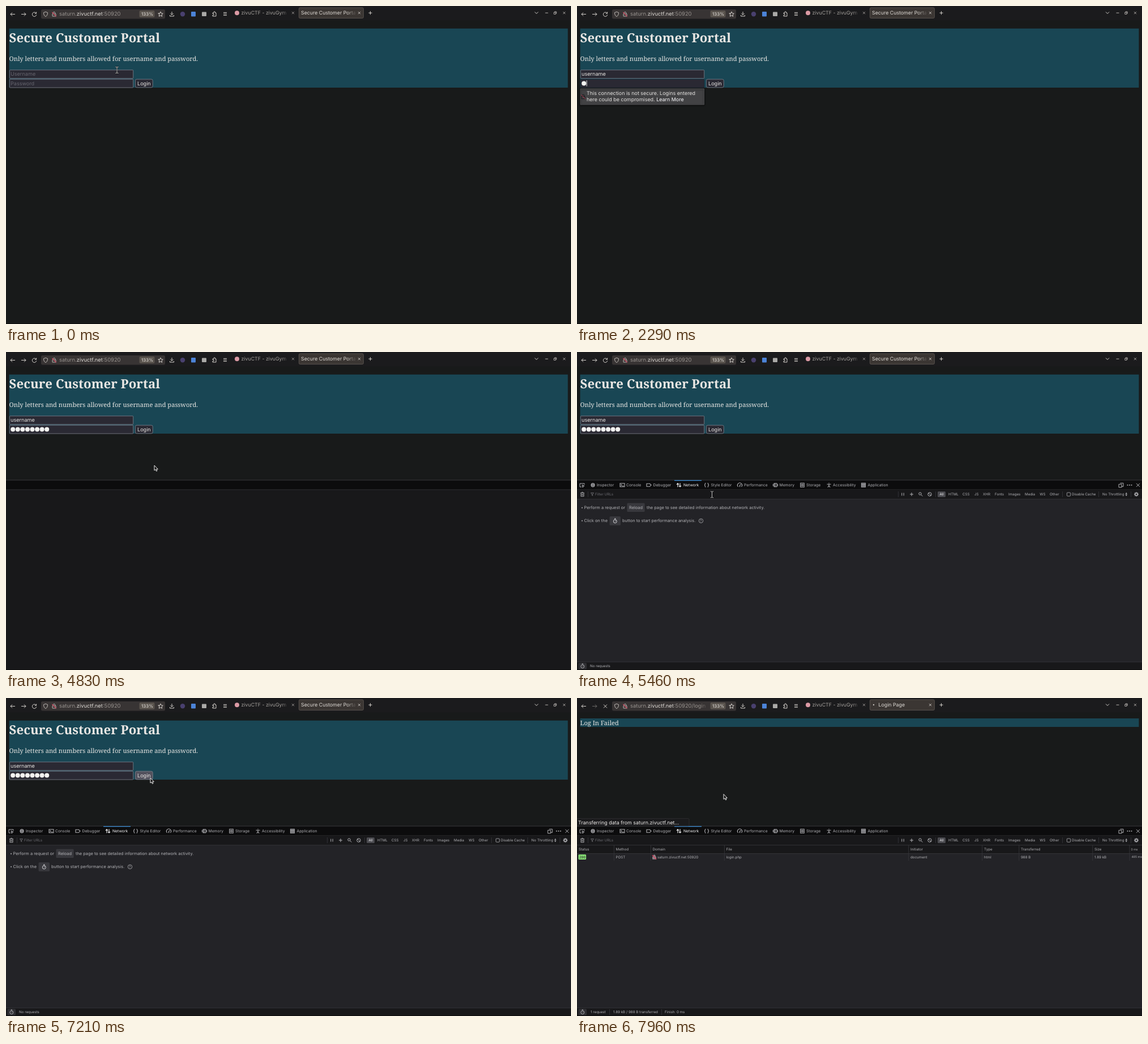
An HTML page with a canvas for the animation above (8 s loop, 998 px wide and 561 px high).

```html
<!DOCTYPE html>
<html lang="en">
<head>
<meta charset="utf-8">
<title>Login request</title>
<style>
html, body { margin: 0; width: 100%; height: 100%; overflow: hidden; background: #181a1a; }
canvas { display: block; }
</style>
</head>
<body>
<canvas id="stage" width="998" height="561"></canvas>
<script>
const ctx = document.getElementById('stage').getContext('2d');
ctx.textRendering = 'geometricPrecision';
const LOOP = 8000;
const HOST = 'saturn.zivuctf.net';
const UI = 'Inter, sans-serif', SERIF = '"Noto Serif", serif', MONO = '"DejaVu Sans Mono", monospace';

// Moments of the story, in ms
const T = {
  focus: 170, userPopup: 420, tab: 1880, closePopup: 4540,
  toolsBlank: 4760, toolsTabs: 4880, toolsFull: 4960, send: 7290, response: 7680
};
const userKeys = [800, 1120, 1260, 1330, 1400, 1470, 1540, 1610];
const passKeys = [...Array(8).keys()].map(i => 2290 + i * 165);

// Pointer path: time, x, y
const pointerPath = [
  [0, 196, 113], [80, 196, 113], [250, 194, 119], [3580, 196, 119], [3880, 262, 200], [5130, 262, 200],
  [5450, 240, 250], [5700, 205, 282], [5930, 210, 262], [6040, 220, 245], [6450, 245, 180],
  [6750, 254, 148], [6920, 255, 141], [7400, 255, 141], [7880, 259, 169.6], [8000, 259, 169.6]
];

function rect(x, y, w, h, color, radius = 0, border) {
  ctx.beginPath();
  ctx.roundRect(x, y, w, h, radius);
  if (color) { ctx.fillStyle = color; ctx.fill(); }
  if (border) { ctx.strokeStyle = border; ctx.lineWidth = 0.8; ctx.stroke(); }
}

function text(str, x, y, size, color, family = UI, weight = 400) {
  ctx.font = `${weight} ${size}px ${family}`;
  ctx.fillStyle = color;
  ctx.fillText(str, x, y);
}

function circle(x, y, r, color) {
  ctx.fillStyle = color;
  ctx.beginPath();
  ctx.arc(x, y, r, 0, 7);
  ctx.fill();
}

// Paths are centred on 0,0
const icons = {
  back: 'M4 0H-4M-1-3L-4 0L-1 3',
  forward: 'M-4 0H4M1-3L4 0L1 3',
  reload: 'M3-2A3.7 3.7 0 1 0 3.7 1M3.6-4V-1.3H.8',
  close: 'M-2-2L2 2M2-2L-2 2',
  stop: 'M-3-3L3 3M3-3L-3 3',
  plus: 'M-3 0H3M0-3V3',
  chevron: 'M-3-1.5L0 1.5L3-1.5',
  minus: 'M-2.5 0H2.5',
  windows: 'M-2.2-1H1V2.2H-2.2ZM-1-1V-2.2H2.2V1H1',
  menu: 'M-3-2.5H3M-3 0H3M-3 2.5H3',
  shield: 'M0-4L3.5-2.7C3.5 1 2.5 3 0 4.3C-2.5 3-3.5 1-3.5-2.7Z',
  lock: 'M-3-.5H3V3.7H-3ZM-1.8-.5V-2A1.8 1.8 0 0 1 1.8-2V-.5',
  slash: 'M-3.6-3.4L3.6 4',
  star: 'M0-4.3L1.3-1.4L4.3-1.1L2 1L2.7 4L0 2.4L-2.7 4L-2-1L-4.3-1.1L-1.3-1.4Z',
  download: 'M0-4V1.5M-2.6-1L0 1.6L2.6-1M-3.5 2V4H3.5V2',
  puzzle: 'M-3-2H-1V-3A1.2 1.2 0 0 1 1.4-3V-2H3V4H-3V2H-2A1.2 1.2 0 0 0-2-.5H-3Z',
  pick: 'M4-1V-3H-4V3H-1M0-.5L4 1.2L2 2L1.2 4Z',
  inspector: 'M-2.5-2.5H2.5V2.5H-2.5ZM-4 0H-2.5M4 0H2.5M0-4V-2.5M0 4V2.5M-1-1H1V1H-1Z',
  console: 'M-4-3H4V3H-4ZM-2.5-1.5L-1 0L-2.5 1.5M0 1.5H2.5',
  debugger: 'M-4-2.5H1.5L4 0L1.5 2.5H-4Z',
  network: 'M-2 3.5V-3M-4-1L-2-3.2L0-1M2-3.5V3M0 1L2 3.2L4 1',
  braces: 'M-1.5-3.5C-4-3.5-1.8 0-4 0C-1.8 0-4 3.5-1.5 3.5M1.5-3.5C4-3.5 1.8 0 4 0C1.8 0 4 3.5 1.5 3.5',
  gauge: 'M-3 2.8A4 4 0 1 1 3 2.8M-.5 1.5L1.8-1.5M-1 2.4H1',
  memory: 'M-2.3-3H2.3V3H-2.3ZM-4-2V2M4-2V2M-.5-3V3',
  storage: 'M-3.2-3.5H3.2V3.5H-3.2ZM-1.5-1.5H1.5M-1.5 1.5H1.5M-3.2 0H3.2',
  person: 'M-3.5-1.5H3.5M0-1.5V1L-2 4M0 1L2 4M-.6-3.5H.6',
  grid: 'M-3.5-3.5H3.5V3.5H-3.5ZM-1.2-3.5V3.5M1.2-3.5V3.5M-3.5-1.2H3.5M-3.5 1.2H3.5',
  trash: 'M-3.3-2.5H3.3M-1.2-3.7H1.2M-2.6-2.5V3.7H2.6V-2.5M-.9-1V2.3M.9-1V2.3',
  funnel: 'M-2.5-2.5H2.5L.6 0V2.5L-.6 1.8V0Z',
  pause: 'M-1.7-2.5V2.5M1.7-2.5V2.5',
  search: 'M1.2-1A2.2 2.2 0 1 1-3.2-1A2.2 2.2 0 1 1 1.2-1M.7 .7L3.4 3.4',
  block: 'M3.2 0A3.2 3.2 0 1 1-3.2 0A3.2 3.2 0 1 1 3.2 0M-2.2-2.2L2.2 2.2',
  gear: 'M2 0A2 2 0 1 1-2 0A2 2 0 1 1 2 0M0-4V-2M0 4V2M-4 0H-2M4 0H2M-2.8-2.8L-1.4-1.4M2.8 2.8L1.4 1.4M2.8-2.8L1.4-1.4M-2.8 2.8L-1.4 1.4',
  dock: 'M-1.5-3.5H4V2.5H1M-4-1.5H1V4H-4Z',
  stopwatch: 'M3 .7A3 3 0 1 1-3 .7A3 3 0 1 1 3 .7M-1.2-4H1.2M0-4V-2.3M0 .8L1.2-.6',
  ring: 'M3.7 0A3.7 3.7 0 1 1-3.7 0A3.7 3.7 0 1 1 3.7 0',
  arrow: 'M0 0V9L2 7.2L3.5 10.3L5 9.6L3.6 6.7H6.3Z',
  ibeam: 'M-2.6-5.4H-.9L0-4.8L.9-5.4H2.6M0-4.8V4.8M-2.6 5.4H-.9L0 4.8L.9 5.4H2.6'
};
for (const name in icons) icons[name] = new Path2D(icons[name]);

function icon(name, x, y, color = '#d4d0cb', width = 1, fill) {
  ctx.save();
  ctx.translate(x, y);
  ctx.lineWidth = width;
  ctx.strokeStyle = color;
  if (fill) { ctx.fillStyle = fill; ctx.fill(icons[name]); }
  ctx.stroke(icons[name]);
  ctx.restore();
}

function fade(x, y, w, h, rgb) {
  const g = ctx.createLinearGradient(x, 0, x + w, 0);
  g.addColorStop(0, `rgba(${rgb},0)`);
  g.addColorStop(1, `rgb(${rgb})`);
  ctx.fillStyle = g;
  ctx.fillRect(x, y, w, h);
}

function drawBrowser(t) {
  const loading = t >= T.send, loaded = t >= T.response;
  rect(0, 0, 998, 25, '#1b1b1d');
  icon('back', 12, 14.5);
  icon('forward', 31, 14.5, loaded ? '#6c6a68' : '#d4d0cb');
  icon(loading ? 'stop' : 'reload', 50, 14.5);

  rect(62, 6, 219, 16.5, '#383434', 2.5);
  icon('shield', 70, 14.3, '#bbb6b1');
  icon('lock', 85, 14.3, '#bbb6b1');
  icon('slash', 85, 14.3, '#d8405c', 1.2);
  text('saturn.', 94, 17.4, 9.4, '#97928e');
  let x = 94 + ctx.measureText('saturn.').width;
  text('zivuctf.net', x, 17.4, 9.4, '#dedad5');
  x += ctx.measureText('zivuctf.net').width;
  text(':50920' + (loaded ? '/login' : ''), x, 17.4, 9.4, '#97928e');
  if (loaded) fade(216, 8, 17, 13, '56,52,52');
  rect(235.5, 8, 27, 12, '#59534d', 2);
  text('133%', 239, 17, 7.9, '#dedad5', UI, 500);
  icon('star', 273, 14.3);

  icon('download', 293, 14);
  circle(312, 14.3, 4.2, '#49406f');
  rect(327, 10, 8, 8.5, '#4c83d8', 1);
  rect(346, 10.5, 8, 7.5, '#aaa9a7', 1);
  icon('puzzle', 368, 14);
  icon('menu', 387, 14);

  circle(408, 12.2, 4, '#dc9aa5');
  text('zivuCTF - zivuGym', 415.5, 15.2, 8.8, '#a5a19d');
  fade(486, 4, 14, 17, '27,27,29');
  icon('close', 507, 12.2, '#a5a19d', .9);
  rect(517.4, 2.9, 114, 18.6, '#3b3633', 2, '#625c57');
  if (loaded) {
    circle(524, 12, 1.2, '#c5c0ba');
    text('Login Page', 532.5, 15.2, 8.8, '#dedad5');
  } else {
    text('Secure Customer Porta', 521, 15.2, 8.8, '#dedad5');
    fade(602, 5, 17, 15, '59,54,51');
  }
  icon('close', 624, 12.2, '#d4d0cb', .9);
  icon('plus', 643.5, 12.2);
  icon('chevron', 937, 12);
  icon('minus', 955, 12.2, '#b8b4b0');
  icon('windows', 970, 12.2, '#b8b4b0', .9);
  icon('close', 986, 12.2, '#b8b4b0', .9);
}

function drawField(y, focused) {
  rect(6.3, y, 218.4, 14.8, '#2a2933', 1, focused ? '#1d2831' : '#81858e');
}

function drawCaret(x, y, t, since) {
  if ((t - since) % 1000 < 500) rect(x, y - 5.2, 0.9, 10.4, '#f4f4f4');
}

function drawPopup(y) {
  ctx.save();
  ctx.shadowColor = '#000a';
  ctx.shadowBlur = 3;
  ctx.shadowOffsetY = 1;
  rect(6, y, 218.5, 28, '#424244', 0, '#57575a');
  ctx.restore();
  icon('lock', 11, y + 14, '#1c1b1e');
  icon('slash', 11, y + 14, '#b7324b');
  text('This connection is not secure. Logins entered', 17, y + 11.1, 8.93, '#e3e1df');
  text('here could be compromised. ', 17, y + 22.4, 8.93, '#e3e1df');
  const x = 17 + ctx.measureText('here could be compromised. ').width;
  text('Learn More', x, y + 22.4, 8.93, '#fbfbfe');
}

function drawPage(t, mouse) {
  const teal = '#194654', ink = '#e8e6e3', left = 5.55, width = 986.9;
  if (t >= T.response) {
    rect(left, 36, width, 15, teal);
    text('Log In Failed', left, 47.8, 11.09, ink, SERIF);
    return;
  }
  rect(left, 39.8, width, 104.2, teal);
  text('Secure Customer Portal', left, 63.5, 22.18, ink, SERIF, 700);
  text('Only letters and numbers allowed for username and password.', left, 96.8, 11.09, ink, SERIF);

  const inUser = t >= T.focus && t < T.tab, inPass = t >= T.tab && t < T.closePopup;
  const typed = keys => keys.filter(k => k <= t).length;
  const userCount = typed(userKeys), passCount = typed(passKeys);

  drawField(112.9, inUser);
  text(userCount ? 'username'.slice(0, userCount) : 'Username', 8, 123.3, 9.1, userCount ? ink : '#66656e');
  if (inUser) {
    const x = userCount ? 8 + ctx.measureText('username'.slice(0, userCount)).width : 8;
    drawCaret(x, 120.2, t, userCount ? userKeys[userCount - 1] : T.focus);
  }
  drawField(129.2, inPass);
  if (!passCount) text('Password', 8, 139.7, 9.1, '#66656e');
  for (let i = 0; i < passCount; i++) circle(12.2 + i * 8.57, 136.6, 4, '#f4f3f1');
  if (inPass) drawCaret(8.1 + 8.6 * passCount, 136.4, t, passCount ? passKeys[passCount - 1] : T.tab);

  const hover = mouse.x > 228 && mouse.x < 260 && mouse.y > 129 && mouse.y < 144;
  rect(228.4, 129.2, 30.8, 14.6, hover ? '#53525e' : '#2a2933', 2.5, '#81858e');
  text('Login', 232, 139.7, 9.1, ink);

  if (inUser && t >= T.userPopup) drawPopup(130);
  if (inPass) drawPopup(146);
}

const toolTabs = [
  ['inspector', 28, 'Inspector', 35], ['console', 80, 'Console', 87], ['debugger', 127, 'Debugger', 134.5],
  ['network', 180, 'Network', 188], ['braces', 229, 'Style Editor', 236.5], ['gauge', 287.5, 'Performance', 295],
  ['memory', 350.5, 'Memory', 357.5], ['storage', 398, 'Storage', 405], ['person', 445, 'Accessibility', 452],
  ['grid', 506, 'Application', 513.5]
];
const filters = [['All', 640.5], ['HTML', 656], ['CSS', 681], ['JS', 702], ['XHR', 717], ['Fonts', 738],
  ['Images', 762], ['Media', 791], ['WS', 817.3], ['Other', 835]];
const columns = [['Status', 3], ['Method', 68.5, 'POST'], ['Domain', 133.5], ['File', 263.5, 'login.php'],
  ['Initiator', 589, 'document'], ['Type', 719, 'html', 1], ['Transferred', 784, '988 B', 1], ['Size', 914, '1.89 kB', 1]];
const LINE = '#38383d', LABEL = '#b1b1b5';
const small = (str, x, y, color = LABEL) => text(str, x, y, 6.24, color);
const divider = (x, y, h) => rect(x, y, 0.8, h, LINE);

function drawToolTabs() {
  icon('pick', 9, 235, LABEL);
  rect(172, 226, 48, 1.3, '#3f91d8');
  for (const [name, ix, label, x] of toolTabs) {
    const color = label === 'Network' ? '#f4f4f6' : LABEL;
    icon(name, ix, 234.8, color, 1.1);
    text(label, x, 237.2, 6.8, color);
  }
  icon('dock', 961, 234.8, LABEL);
  for (const x of [972.5, 976, 979.5]) circle(x, 234.8, 1, LABEL);
  icon('stop', 991, 234.8, LABEL);
}

function drawFilterRow() {
  rect(0, 243, 998, 16.5, '#18181a');
  rect(0, 259, 998, 0.8, LINE);
  icon('trash', 9.5, 251, LABEL, .9);
  divider(19, 246, 10);
  icon('funnel', 27, 251, '#77777c', .8);
  small('Filter URLs', 32, 253.2, '#6d6d73');
  divider(567, 246, 10);
  icon('pause', 575.5, 251, LABEL);
  icon('plus', 591, 251, LABEL);
  icon('search', 607, 251, LABEL);
  icon('block', 623, 251, LABEL);
  divider(633, 246, 10);
  rect(637, 246, 14, 10, '#4a4a4f', 1.5);
  for (const [label, x] of filters) small(label, x, 253.2, label === 'All' ? '#f4f4f6' : LABEL);
  divider(857, 246, 10);
  rect(865.4, 248, 6.2, 6.2, null, 1, LABEL);
  small('Disable Cache', 874, 253.2);
  divider(921, 246, 10);
  small('No Throttling', 928, 253.2);
  ctx.fillStyle = LABEL;
  ctx.fill(new Path2D('M968.5 250.4L970.3 247.8L972 250.4ZM968.5 251.6L970.3 254.2L972 251.6Z'));
  divider(978, 246, 10);
  icon('gear', 988, 251, LABEL, 1.3);
}

function drawHints() {
  const hint = (str, x, y) => text(str, x, y, 7.43, LABEL);
  circle(9, 274.7, 1, LABEL);
  hint('Perform a request or', 12.5, 276.8);
  rect(88.4, 266.5, 31.2, 15.5, '#38383d', 1.5);
  hint('Reload', 92, 276.8);
  hint('the page to see detailed information about network activity.', 123, 276.8);
  circle(9, 297.8, 1, LABEL);
  hint('Click on the', 12.5, 299.9);
  rect(57.5, 290, 19.5, 15.8, '#38383d', 1.5);
  icon('stopwatch', 67.3, 298, '#d7d7db');
  hint('button to start performance analysis.', 80, 299.9);
  icon('ring', 219, 297.8, LABEL, .8);
  text('?', 217.3, 300.1, 6, LABEL);
}

function drawRequests(done) {
  rect(0, 260, 998, 14, '#18181a');
  rect(0, 274, 998, 0.8, LINE);
  for (const [label, x, value, late] of columns) {
    small(label, x, 269.3);
    if (x > 3) divider(x - 3.6, 260, 27);
    if (value && (done || !late)) small(value, x, 282.7);
  }
  divider(975.6, 260, 27);
  text('0 ms', 978.5, 269.2, 5.2, LABEL);
  icon('lock', 136.5, 280.5, '#8f8489', .9, '#8f8489');
  icon('slash', 136.5, 280.5, '#e0405f', 1.3);
  small(HOST + ':50920', 142, 282.7);
  if (done) {
    rect(2.5, 276, 13.6, 9, '#86de74', 1.5);
    text('200', 4, 282.7, 6, '#232327', MONO);
    text('465 ms', 979.5, 282.3, 5.2, LABEL);
  }
}

function drawTools(t) {
  if (t < T.toolsBlank) return;
  const full = t >= T.toolsFull, sent = t >= T.send, done = t >= T.response;
  rect(0, 226, 998, 335, full ? '#232327' : '#18181a');
  rect(0, 226, 998, 17, '#0c0c0d');
  rect(0, 225.6, 998, 0.8, LINE);
  rect(0, 242.4, 998, 0.8, LINE);
  if (t >= T.toolsTabs) drawToolTabs();
  if (!full) return;
  drawFilterRow();
  if (sent) drawRequests(done); else drawHints();

  rect(0, 547, 998, 14, '#18181a');
  rect(0, 546.4, 998, 0.8, LINE);
  rect(2.5, 548.5, 14.5, 11, '#303034', 1.5);
  icon('stopwatch', 9.8, 554, LABEL, .9);
  if (!sent) small('No requests', 23, 556.4);
  else {
    small('1 request', 24, 556.4);
    divider(57, 549, 10);
    small((done ? '1.89 kB / 988 B' : '0 B / 0 B') + ' transferred', 64, 556.4);
    if (done) {
      divider(149, 549, 10);
      small('Finish: 0 ms', 155, 556.4);
    }
  }
  if (sent) {
    rect(-2, 212.6, 200, 13.2, '#1b1b1d', 1.5, '#303033');
    text((done ? 'Transferring data from ' : 'Waiting for ') + HOST + '...', 2, 222.9, 8.93, '#eeecea');
  }
}

function pointerAt(t) {
  const i = pointerPath.findIndex(p => p[0] > t);
  const [t0, x0, y0] = pointerPath[i - 1], [t1, x1, y1] = pointerPath[i];
  const u = (t - t0) / (t1 - t0), lerp = (a, b) => a + (b - a) * u;
  return { x: lerp(x0, x1), y: lerp(y0, y1) };
}

function drawPointer(t, { x, y }) {
  if (t > T.userPopup && t < 3580) return;
  const overText = t < 3650 || (t >= T.toolsFull && y > 243 && y < 259);
  if (overText) {
    icon('ibeam', x, y, '#000', 2);
    icon('ibeam', x, y, '#eee', .9);
  } else {
    icon('arrow', x, y, '#ececec', 1, '#111');
  }
}

function frame(now) {
  const t = now % LOOP, mouse = pointerAt(t);
  rect(0, 0, 998, 561, '#181a1a');
  drawBrowser(t);
  drawPage(t, mouse);
  drawTools(t);
  rect(0, 560, 998, 1, '#0d0d0e');
  drawPointer(t, mouse);
  requestAnimationFrame(() => frame(performance.now() - start));
}
const start = performance.now();
frame(0);
</script>
</body>
</html>
```
